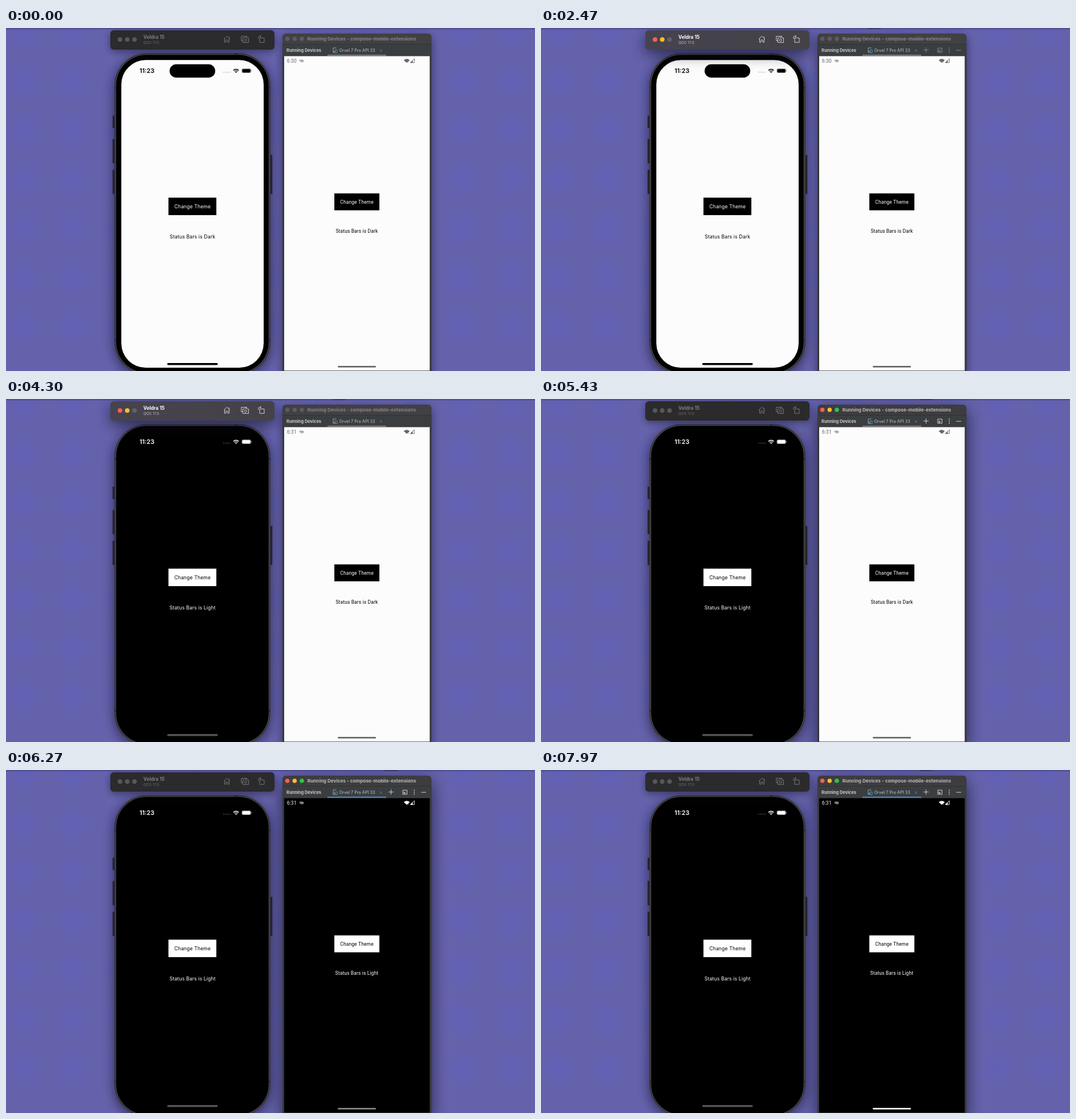
Recreate the animation shown at these times as an HTML page with a canvas. Size 928x603 px, loop 8000 ms.

```html
<!DOCTYPE html>
<html lang="en">
<head>
<meta charset="utf-8">
<title>Theme switch on two devices</title>
<style>
  html, body { margin: 0; width: 100%; height: 100%; overflow: hidden; background: #6562ad; }
  canvas { display: block; }
</style>
</head>
<body>
<canvas id="stage" width="928" height="603"></canvas>
<script>
const ctx = document.getElementById('stage').getContext('2d');
const LOOP = 8000;
const SANS = 'Inter, sans-serif';
const ROBOTO = 'Roboto, sans-serif';
const TRAFFIC = ['#fb5f57', '#fdbc2e', '#28c840'];

// Moments of the story, in ms
const CUE = {
  hoverTools: 1950, phoneFocus: 2100, clockTick: 2600,
  press: 3600, phoneDark: 3790, toolsHide: 4050,
  windowFocus: 5430, windowDark: 5950, navBright: 6500
};

function rect(x, y, w, h, fill, radius = 0) {
  ctx.fillStyle = fill;
  ctx.beginPath();
  ctx.roundRect(x, y, w, h, radius);
  ctx.fill();
}

function shadowed(blur, offset, alpha, paint) {
  ctx.save();
  ctx.shadowColor = `rgba(15,15,35,${alpha})`;
  ctx.shadowBlur = blur;
  ctx.shadowOffsetY = offset;
  paint();
  ctx.restore();
}

function disc(x, y, r, fill) {
  ctx.fillStyle = fill;
  ctx.beginPath();
  ctx.arc(x, y, r, 0, Math.PI * 2);
  ctx.fill();
}

function line(d, color, width = 1) {
  ctx.strokeStyle = color;
  ctx.lineWidth = width;
  ctx.stroke(new Path2D(d));
}

function shape(d, color) {
  ctx.fillStyle = color;
  ctx.fill(new Path2D(d));
}

function text(str, x, y, font, color, { align = 'left', spacing = 0 } = {}) {
  ctx.font = font;
  ctx.textAlign = align;
  ctx.letterSpacing = spacing + 'px';
  ctx.fillStyle = color;
  ctx.fillText(str, x, y);
}

// A fan-shaped wifi sign with its tip at (x, y)
function wifiFan(x, y, r, color) {
  ctx.fillStyle = color;
  ctx.beginPath();
  ctx.moveTo(x, y);
  ctx.arc(x, y, r, -Math.PI * 0.77, -Math.PI * 0.23);
  ctx.fill();
}

function wifiArcs(x, y, color) {
  wifiFan(x, y, 2.2, color);
  ctx.strokeStyle = color;
  ctx.lineWidth = 1.4;
  for (const r of [3.9, 6.5]) {
    ctx.beginPath();
    ctx.arc(x, y, r, -Math.PI * 0.76, -Math.PI * 0.24);
    ctx.stroke();
  }
}

function trafficLights(x, y, r, step, colors) {
  colors.forEach((color, i) => disc(x + i * step, y, r, color));
}

function background(markX) {
  ctx.fillStyle = '#6562ac';
  ctx.fillRect(0, 0, 928, 603);
  const step = 85.6;
  for (let x = 30; x < 928; x += step) {
    for (let y = 9.5; y < 603; y += step) {
      const glow = ctx.createRadialGradient(x, y, 0, x, y, 36);
      glow.addColorStop(0, 'rgba(94,94,190,.55)');
      glow.addColorStop(1, 'rgba(94,94,190,0)');
      ctx.fillStyle = glow;
      ctx.fillRect(x - 36, y - 36, 72, 72);
    }
  }
  rect(0, 0, 928, 2.5, '#525092');
  if (markX) rect(markX, 0, 23, 2, '#3f3e70');
}

function phoneToolbar(active) {
  let fill = '#2b2a2c';
  if (active) {
    fill = ctx.createLinearGradient(183, 0, 471, 0);
    fill.addColorStop(0, '#46434f');
    fill.addColorStop(1, '#444247');
  }
  shadowed(active ? 26 : 14, active ? 8 : 4, active ? 0.65 : 0.5,
    () => rect(183, 4, 288, 34, fill, 6));
  const off = active ? '#646267' : '#585759';
  trafficLights(200, 20.3, 4, 12.7, active ? [TRAFFIC[0], TRAFFIC[1], off] : [off, off, off]);
  text('Veldra 15', 241, 19.2, `700 8.4px ${SANS}`, active ? '#fff' : '#7d7c7e');
  text('QOS 17.0', 241, 28, `400 6.6px ${SANS}`, active ? '#bdbbc0' : '#69686a');

  const ink = active ? '#d0ced3' : '#777678';
  line('M382 19.5 L387.5 14.3 L393 19.5 M383.5 18.5 V25 H386 V21 H389 V25 H391.5 V18.5 M391.3 17.5 V15', ink);
  line('M415 22.5 H412.8 V14.5 H422.5 V16.5 M415.5 17.5 H417.5 L418.5 16.3 H422 L423 17.5 H425.5 V25.5 H415.5 Z', ink);
  ctx.beginPath();
  ctx.arc(420.4, 21.3, 2.1, 0, Math.PI * 2);
  ctx.stroke();
  line('M445 17.5 H453 V25.3 H445 Z M443 19 V16 Q443 14.5 445 14.5 H447.5 M446 12.9 L447.8 14.5 L446 16.2', ink);
}

function phone(dark, pressed) {
  const bg = dark ? '#000' : '#fcfcfd';
  const ink = dark ? '#fff' : '#000';
  for (const [x, y, h] of [[187, 154, 22], [187, 195, 43], [187, 249, 43], [464, 223, 69]]) {
    rect(x, y, 3.2, h, '#2c2b2e', 1);
  }
  shadowed(22, 5, 0.7, () => rect(190.5, 44.5, 273, 564, '#252426', 56));
  rect(191.5, 45.5, 271, 562, '#4a4947', 55);
  rect(193.2, 47.2, 267.6, 558.6, '#000', 53);
  for (const y of [104, 547]) {
    rect(191, y, 3, 3, '#242322');
    rect(460, y, 3, 3, '#242322');
  }
  rect(402, 45, 4, 2.5, '#242322');
  rect(202.3, 56.3, 249.7, 541, bg, 43);
  if (!dark) rect(287, 63.8, 80, 23.4, '#000', 11.7);

  text('11:23', 234.3, 79, `600 10.7px ${SANS}`, ink);
  for (let i = 0; i < 4; i++) disc(382.3 + i * 3.5, 77.6, 0.85, dark ? '#666' : '#aaa');
  wifiArcs(403.7, 79, ink);
  rect(413.5, 71.3, 16.3, 7.8, dark ? '#777' : '#999', 2.5);
  rect(414.5, 72.2, 14.2, 6, ink, 1.6);
  rect(430.3, 73.8, 1, 2.8, dark ? '#888' : '#999', 0.5);

  rect(285, 298.3, 84, 30.8, dark ? '#fff' : '#000');
  const font = `400 8.6px ${SANS}`;
  const centered = { align: 'center', spacing: 0.15 };
  text('Change Theme', 327.2, 317.2, font, pressed ? '#aaa' : bg, centered);
  text(`Status Bars is ${dark ? 'Light' : 'Dark'}`, 327.2, 369.6, font, ink, centered);
  rect(282.8, 589, 88.8, 3.4, dark ? '#555' : '#000', 1.7);
}

function windowTools(color) {
  line('M671 38.7 H680 M675.5 34.2 V43.2', color);
  line('M696 35.3 H703.5 V42.7 H696 Z M698 38 V41 H701 M698.2 40.8 L701 38', color);
  for (const y of [35.5, 39, 42.5]) disc(716.2, y, 0.9, color);
  line('M728.5 39.2 H737', color);
}

function deviceWindow({ active, blueTab, tools }) {
  shadowed(active ? 30 : 17, active ? 9 : 5, active ? 0.75 : 0.6,
    () => rect(485, 10, 261.3, 600, '#38383a', 6));
  rect(485.5, 10.5, 260.3, 18.5, active ? '#3d3c3f' : '#414043', [6, 6, 0, 0]);
  rect(486, 28.6, 259.5, 21.4, '#3b3e40');
  rect(486, 28.2, 259.5, 0.9, '#2c2c2e');
  trafficLights(493.6, 19, 3.8, 12.7, active ? TRAFFIC : Array(3).fill('#5c5b5e'));
  text('Running Devices - compose-mobile-extensions', 528.8, 21.9,
    `700 8.2px ${SANS}`, active ? '#b9b8ba' : '#858487');
  text('Running Devices', 492, 42.1, `700 7.45px ${SANS}`, '#c8cacb');
  line('M579.5 35 H574 V43 H577 M574 41 H577', '#a9adb0', 0.9);
  line('M577.5 38.5 H581 V43.5 H577.5 Z', '#4d9fc0', 0.9);
  text('Orvel 7 Pro API 33', 584.5, 42.1, `400 7.3px ${SANS}`, '#c0c2c4');
  line('M655.8 37.7 L659.6 41.5 M659.6 37.7 L655.8 41.5', '#7c7f81', 0.9);
  rect(564, 46.7, 103, 2.4, blueTab ? '#4a82c8' : '#77797c');
  if (tools) windowTools(active ? '#cdd0d2' : '#85888a');
}

function androidScreen(dark, clock, navColor) {
  const bg = dark ? '#000' : '#fcfcfd';
  const ink = dark ? '#fff' : '#000';
  const status = dark ? '#f4f4f4' : '#66676a';
  rect(488, 49.6, 255.3, 552.6, bg);
  text(clock, 492.7, 60.5, `400 8.8px ${ROBOTO}`, status);
  wifiFan(518, 60.8, 5.6, dark ? '#777' : '#b4b4b4');
  text('?', 519.3, 61, `700 6px ${ROBOTO}`, status);
  wifiFan(703, 61.2, 7, status);
  text('!', 704.9, 61.2, `700 6px ${ROBOTO}`, status);
  line('M716.3 54 V60.8 H709.5 Z', status, 0.9);
  shape('M713.5 56.6 V61.2 H709 Z', status);

  rect(576, 290.8, 79, 29.8, ink);
  const font = `400 8.45px ${ROBOTO}`;
  const centered = { align: 'center', spacing: 0.15 };
  text('Change Theme', 615.5, 308.7, font, bg, centered);
  text(`Status Bars is ${dark ? 'Light' : 'Dark'}`, 615.4, 359.8, font, ink, centered);
  rect(582, 594.1, 67, 2.6, navColor, 1.3);
}

function draw(t) {
  const between = (from, to) => t >= from && t < to;
  const windowActive = t >= CUE.windowFocus;
  const windowDark = t >= CUE.windowDark;
  const phoneActive = between(CUE.phoneFocus, CUE.windowFocus);

  background(windowActive ? 664 : phoneActive ? 573 : 0);
  deviceWindow({
    active: windowActive,
    blueTab: windowDark,
    tools: windowActive || between(CUE.hoverTools, CUE.toolsHide)
  });
  androidScreen(windowDark, t < CUE.clockTick ? '6:30' : '6:31',
    t >= CUE.navBright ? '#f2f2f2' : windowDark ? '#858585' : '#68686a');
  phone(t >= CUE.phoneDark, between(CUE.press, CUE.phoneDark));
  phoneToolbar(phoneActive);
}

const start = performance.now();
function tick() {
  draw((performance.now() - start) % LOOP);
  requestAnimationFrame(tick);
}
tick();
</script>
</body>
</html>
```
